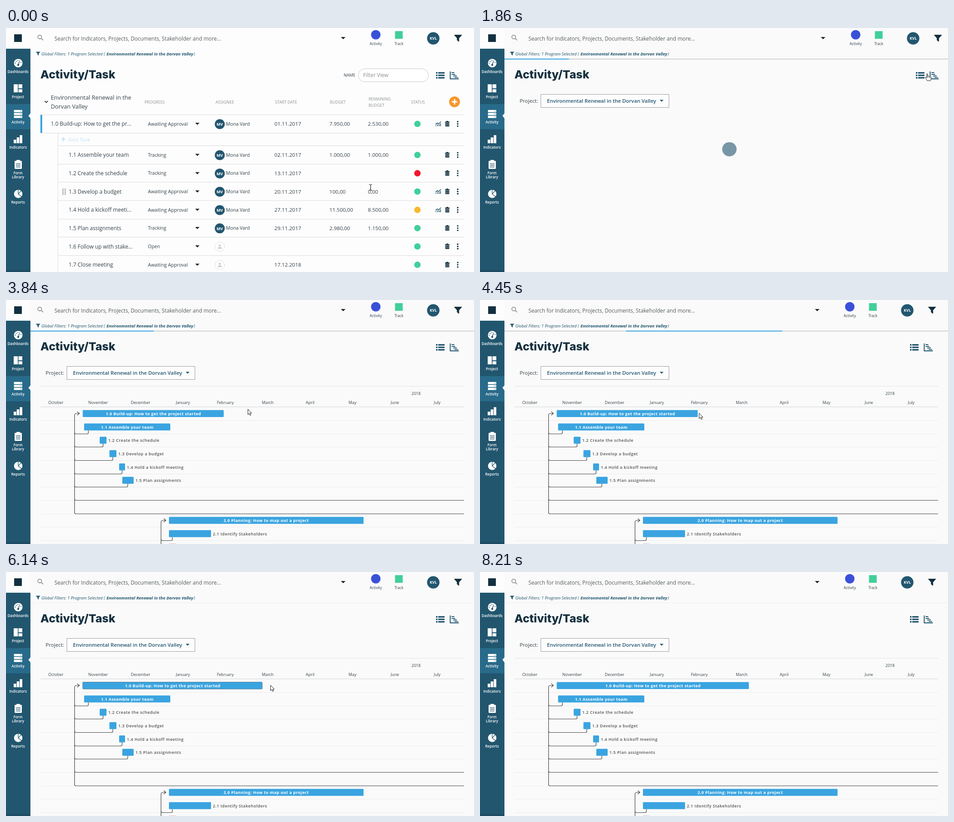
An HTML page that plays this animation: 1034 px wide and 542 px high, repeating every 8.57 s.

```html
<!DOCTYPE html>
<html lang="en">
<head>
<meta charset="utf-8">
<title>Activity planner</title>
<style>
  html, body { margin: 0; width: 100%; height: 100%; overflow: hidden; background: #fafafa; }
  svg { display: block; }
  text { font-family: "Open Sans", "Noto Sans", sans-serif; fill: #34424a; white-space: pre; }
  .title { font: 800 25px Inter, sans-serif; fill: #14303f; }
  .semi { font-weight: 600; }
  .bold { font-weight: 700; }
  .mid { text-anchor: middle; }
  .white { fill: #fff; }
  .navy { fill: #22566f; }
  .faint { fill: #c5e6f7; }
  .soft { fill: #555b60; }
  .head { fill: #8b8f92; }
  .it { font-style: italic; }
  .label { font-weight: 600; letter-spacing: .5px; fill: #505050; }
  .bar { font-weight: 700; letter-spacing: .4px; fill: #fff; text-anchor: middle; }
</style>
</head>
<body>
<svg id="stage" width="1034" height="542" viewBox="0 0 1034 542"></svg>
<script>
const LOOP = 8570;
const NAVY = '#22566f', BLUE = '#3aa4e0', GREEN = '#41cf9b', INK = '#14303f';
const PROGRAM = ['Environmental Renewal in the', 'Dorvan Valley'];
const PERSON = 'Mona Vard', INITIALS = 'MV';

const text = (x, y, str, size, cls = '', more = '') =>
  `<text x="${x}" y="${y}" font-size="${size}" class="${cls}" ${more}>${str}</text>`;
const rect = (x, y, w, h, fill, more = '') =>
  `<rect x="${x}" y="${y}" width="${w}" height="${h}" fill="${fill}" ${more}/>`;
const circle = (x, y, r, fill, more = '') =>
  `<circle cx="${x}" cy="${y}" r="${r}" fill="${fill}" ${more}/>`;
const path = (d, fill, more = '') => `<path d="${d}" fill="${fill}" ${more}/>`;
const line = (d, color, width = 1, more = '') =>
  path(d, 'none', `stroke="${color}" stroke-width="${width}" ${more}`);
const group = (id, body) => `<g id="${id}">${body}</g>`;
const each = (list, fn) => list.map(fn).join('');
const caret = (x, y, w, color) => path(`M${x} ${y}h${w}l${-w / 2} ${w / 2}z`, color);
const funnel = (x, y, s, color) =>
  path('M0 0H17L10.5 7.5V15L6.5 12V7.5Z', color,
    `transform="translate(${x} ${y}) scale(${s})" stroke="${color}" stroke-linejoin="round"`);

function sidebar() {
  const labels = [['Dashboards', 100], ['Project', 156], ['Activity', 212], ['Indicators', 268],
    ['Form', 325], ['Library', 334], ['Reports', 390]];
  return rect(0, 0, 54, 46, '#fdfdfd') + rect(18, 14, 17, 17, INK) +
    rect(0, 46, 54, 496, NAVY) + rect(0, 169, 54, 56, '#286a89') + rect(0, 538, 54, 4, '#1e4c62') +
    path('M54 189.5V200.5L49.5 195Z', '#fafafa') +
    circle(27, 78, 9.5, '#fff') +
    line('M20.5 79a6.5 6.5 0 0 1 13 0', NAVY, 1.8, 'stroke-dasharray="1.8 2.3"') +
    line('M27 82L29.5 75', NAVY, 1.5) + circle(27, 82, 2.2, NAVY) +
    rect(17, 125, 9, 18, '#fff') + rect(27.5, 125, 8.5, 9, '#fff') + rect(27.5, 136, 8.5, 7, '#fff') +
    each([182, 188.5, 195], y => rect(17.5, y, 18.5, 5, '#fff', 'rx="1"') + rect(32, y + 2, 2, 1, NAVY)) +
    each([0, 1, 2], i => rect(17 + i * 6.7, 248 - i * 5, 5.6, 8 + i * 5, '#fff')) +
    rect(19, 295, 16, 18, '#fff', 'rx="1.5"') + rect(23, 293, 8, 4, '#fff', 'rx="1"') +
    each([301, 304.5, 308], y => rect(22, y, 10, 1.3, NAVY)) +
    circle(27, 368.5, 9.3, '#fff') + line('M33 362L27 368.5L34 374.5M27 368.5V359', NAVY, 1.2) +
    each(labels, ([s, y]) => text(26.5, y, s, 8, 'mid semi white'));
}

function header() {
  const chartIcon = 'M980.5 96.5h2v15.5h18v2h-20zM984.5 98h6v2h-6zM984.5 102h8v2h-8zM988 105.5h8v2h-8zM991 109h8v1.8h-8z';
  return circle(74.5, 20, 4.2, 'none', 'stroke="#777" stroke-width="1.3"') +
    line('M77.5 23L82 27', '#777', 1.5) +
    text(107, 27.5, 'Search for Indicators, Projects, Documents, Stakeholder and more...', 11.72, 'soft') +
    funnel(66.5, 53, 0.52, NAVY) +
    text(78, 61, 'Global Filters: 1 Program Selected (', 9.2, 'it navy') +
    text(222, 61, PROGRAM.join(' '), 9.2, 'it bold navy') + text(415, 61, ')', 9.2, 'it navy') +
    group('tools',
      caret(740, 20, 10, '#222') +
      circle(817, 15, 10.5, '#3b50d8') + text(817, 38, 'Activity', 8.2, 'mid') +
      rect(859.5, 7, 17, 17, GREEN) + text(868, 38, 'Track', 8.2, 'mid') +
      circle(944, 23, 13.7, NAVY) + text(944, 26.2, 'KVL', 8.4, 'mid bold white') +
      funnel(990.5, 15.5, 0.97, INK)) +
    text(76, 112, 'Activity/Task', '', 'title') +
    group('views',
      each([98, 103.5, 109], y => rect(950, y, 3.5, 3.3, NAVY) + rect(955, y, 14, 3.3, NAVY)) +
      path(chartIcon, NAVY, 'id="chartIcon"'));
}

const handle = (x, y) => each([0, 1, 2, 3, 4, 5, 6, 7],
  i => rect(x + (i % 2) * 5, y - 6.5 + (i >> 1) * 3.7, 2.8, 2.4, '#a0a0a0'));

const rows = [
  ['1.0 Build-up: How to get the pr...', 'Awaiting Approval', '01.11.2017', '7.950,00', '2.530,00', 1],
  ['1.1 Assemble your team', 'Tracking', '02.11.2017', '1.000,00', '1.000,00'],
  ['1.2 Create the schedule', 'Tracking', '13.11.2017', '', ''],
  ['1.3 Develop a budget', 'Awaiting Approval', '20.11.2017', '100,00', '0,00', 1],
  ['1.4 Hold a kickoff meeti...', 'Awaiting Approval', '27.11.2017', '11.500,00', '8.500,00', 1],
  ['1.5 Plan assignments', 'Tracking', '29.11.2017', '2.980,00', '1.150,00'],
  ['1.6 Follow up with stake...', 'Open', '', '', ''],
  ['1.7 Close meeting', 'Awaiting Approval', '17.12.2018', '', '']
];
const rowY = i => i ? 282 + (i - 1) * 40.65 : 213;
const lights = { 2: '#f3172d', 4: '#f9b82f' };

function row([name, progress, date, budget, rest, chart], i) {
  const y = rowY(i), base = y + 4.3;
  const who = i < 6
    ? circle(472.3, y + 0.5, 11, NAVY) + text(472.3, y + 4, INITIALS, 9, 'mid bold white') + text(486, y + 3.8, PERSON, 10.4)
    : circle(472.3, y + 0.5, 10.5, 'none', 'stroke="#ccc" stroke-dasharray="2 1.5"') +
      circle(472.3, y - 2, 2.3, '#ccc') + path(`M467.8 ${y + 5}q0-3.5 3-3.5h3q3 0 3 3.5z`, '#ccc');
  return text(i ? 138.5 : 99, base, name, 11.85) + text(313.5, y + 3.8, progress, 10.5) +
    caret(418, y - 2.5, 9.5, '#222') + who +
    text(593, base, date, 11.6) + text(714.5, base, budget, 11.6) + text(799.5, base, rest, 11.6) +
    circle(909, y, 7.1, lights[i] || GREEN) +
    (chart ? line(`M949 ${y + 1}l4-3 3 2 5-5M950 ${y + 5}v-2M953.5 ${y + 5}v-4M957 ${y + 5}v-3.5M960 ${y + 5}v-6`, NAVY, 1.6) : '') +
    path(`M970 ${y - 5}h3v-1.5h4v1.5h3v2h-10zM970.8 ${y - 2.3}h8.4v8h-8.4z`, INK) +
    line(`M973.3 ${y - 1}v5.5M976.7 ${y - 1}v5.5`, '#fff', 0.8) +
    each([-5, 0, 5], d => circle(998, y + d, 1.7, INK)) +
    group('handle' + i, handle(i ? 124.5 : 86, y));
}

function listPage() {
  const heads = [['PROGRESS', 306, 168], ['ASSIGNEE', 463, 168], ['START DATE', 594.5, 168], ['BUDGET', 715.5, 168],
    ['REMAINING', 801, 160.5], ['BUDGET', 801, 174.5], ['STATUS', 895, 168]];
  return text(746, 108, 'NAME', 9.1) +
    rect(778.5, 90.5, 155, 29, '#fff', 'rx="14.5" stroke="#c8c8c8"') + text(789, 109, 'Filter View', 11.7, 'head') +
    line('M85.5 162L89 165.5L92.5 162', '#222', 1.6) +
    each(PROGRAM, (s, i) => text(99, 159 + i * 19.5, s, 12.8, '', 'font-weight="500"')) +
    each(heads, ([s, x, y]) => text(x, y, s, 8.9, 'head')) +
    circle(991, 164, 12, '#f7982c') + line('M991 158v12M985 164h12', '#fff', 3.2) +
    line('M76 192.5H1012M76 233.5H1012M114.5 233V542', '#dcdcdc') +
    rect(76, 193, 4, 40, BLUE) +
    each([0, 1, 2, 3, 4, 5, 6], i => line(`M114 ${Math.round(261 + i * 40.65) + 0.5}H1012`, '#dcdcdc')) +
    line('M122 247h9.5M126.7 242.3v9.5', '#bfe3f6', 2) + text(138, 251.5, 'Add Task', 11.6, 'faint') +
    each(rows, row);
}

function projectPicker() {
  return text(87.5, 166, 'Project:', 11.6) +
    rect(134.5, 147.5, 283, 29, '#fdfdfd', 'stroke="#9b9b9b"') +
    text(148, 166, PROGRAM.join(' '), 11.3, 'semi navy') + caret(397, 159.5, 8.5, NAVY);
}

const ROW = 29.65;
const rowLine = i => Math.floor(267.5 + i * ROW) + 0.5;
const chartBar = (x, end, i, more = '') => rect(x, 244.5 + i * ROW, end - x, 15.5, BLUE, `rx="1.5" ${more}`);

function ganttPage() {
  const months = ['October', 'November', 'December', 'January', 'February', 'March', 'April', 'May', 'June', 'July'];
  // bar start, bar end, connector x, label
  const tasks = [[172.5, 363, 182, ''], [207, 222, 214.5, '1.2 Create the schedule'], [228.5, 244, 236, '1.3 Develop a budget'],
    [250, 263, 256.5, '1.4 Hold a kickoff meeting'], [257, 282, 269, '1.5 Plan assignments']];
  const wire = d => line(d, '#454545', 1.2);
  const join = (x, from, i) => wire(`M${x} ${rowLine(i) - 8}v5q0 3-3 3H${from + 3}q-3 0-3-3`);
  return line('M76 191.5H1012', '#e2e2e2') + line('M76 237.5H1012', '#d6d6d6') +
    each([0, 1, 2, 3, 4, 5, 6, 7, 8, 9], i => line(`M76 ${rowLine(i)}H1012`, '#ededed')) +
    each(months, (m, i) => text(110 + i * 93.65, 230.5, m, 8.9, 'mid')) + text(906, 211, '2018', 8.9, 'mid') +
    wire('M151.5 472V256q0-4 4-4H162M157.5 248l4.7 4-4.7 4') +
    each([6, 7], i => wire(`M1012 ${rowLine(i) - 0.5}H154.5q-3 0-3-3`)) +
    wire('M342.5 542V493.5q0-4 4-4H353M348.5 485.5l4.7 4-4.7 4') + join(367.5, 342.5, 9) +
    each(tasks, ([x, end, drop, name], i) =>
      join(drop, 151.5, i + 1) + chartBar(x, end, i + 1) + text(end + 4, 256 + (i + 1) * ROW, name, 9, 'label')) +
    text(268, 285.7, '1.1 Assemble your team', 9, 'bar') +
    chartBar(360, 790, 8) + text(575, 493.3, '2.0 Planning: How to map out a project', 9, 'bar') +
    chartBar(360, 453, 9) + text(457, 523, '2.1 Identify Stakeholders', 9, 'label') +
    rect(360, 541.5, 15, 2, '#a9899f') +
    chartBar(169.5, 481, 0, 'id="mainBar"') +
    text(325, 256.2, '1.0 Build-up: How to get the project started', 9, 'bar', 'id="mainLabel"') +
    group('grips', each([0, 1], i =>
      rect(170, 245.5, 6.5, 14, '#d3d9dd', `id="grip${i}" rx="1.5" stroke="#7d8c96" stroke-width=".8"`)));
}

const outline = 'stroke="#222" stroke-width="1" stroke-linejoin="round"';
const cursors =
  group('ibeam', line('M-3.5-6.5q3 0 3.5 1.2q.5-1.2 3.5-1.2M0-5.5V5.5M-3.5 6.5q3 0 3.5-1.2q.5 1.2 3.5 1.2', '#222', 1.2)) +
  group('arrow', path('M.5.5V12.5L3.3 10L5.3 14.3L7.2 13.4L5.3 9.3H8.8Z', '#fff', outline)) +
  group('hand', path('M-1 1.2q1-1.5 2 0V6q3-.5 4 .5q3 0 4 1.5V11q-.5 3-2 5H0Q-3 12-4 9q0-1.5 1.5-.8L-1 9.8Z', '#fff', outline) +
    line('M1 6v3.5M4 7v3M6.5 8v2.5', '#222', 0.8)) +
  group('resize', path('M-8.5 0l4-3.8v2.7h9v-2.7l4 3.8-4 3.8v-2.7h-9v2.7z', '#fff', outline));

document.getElementById('stage').innerHTML =
  rect(0, 0, 1034, 542, '#fafafa', 'id="paper"') + sidebar() + header() +
  group('list', listPage()) +
  group('chart', projectPicker() + group('gantt', line('M54 68.5H1034', '#eee') + ganttPage())) +
  group('spinner', each(['pulseA', 'pulseB'], id => circle(551, 269.3, 0, NAVY, `id="${id}" opacity=".6"`))) +
  group('progress', rect(54, 68, 980, 2, '#d2d2d2') + rect(54, 68, 0, 2, BLUE, 'id="runner"')) +
  group('cursor', cursors);

const $ = id => document.getElementById(id);
const show = (id, on) => $(id).style.display = on ? '' : 'none';
const set = (id, name, value) => $(id).setAttribute(name, value);
const smooth = k => k * k * (3 - 2 * k);

// Value at time t along [time, value] points
function track(points, t, ease = k => k) {
  if (t <= points[0][0]) return points[0][1];
  for (let i = 1; i < points.length; i++) {
    const [t0, a] = points[i - 1], [t1, b] = points[i];
    if (t < t1) return a + (b - a) * ease((t - t0) / (t1 - t0));
  }
  return points[points.length - 1][1];
}

const route = [[360, 805.5, 354], [1210, 986, 114], [1270, 986, 114], [1390, 988, 101], [3390, 988, 101], [3840, 534, 242],
  [4400, 484, 251], [4900, 473, 252], [5750, 473, 252], [6140, 584, 251], [6370, 587, 252], [7570, 587, 252], [8190, 1002, 546]];
const routeX = route.map(p => [p[0], p[1]]), routeY = route.map(p => [p[0], p[2]]);
const barEnd = [[5750, 481], [6140, 566], [6370, 594]];
const loadClock = [[1860, 0.005], [2850, 0.5995], [3840, 1.166], [4950, 1.82]];
const shapes = [[450, 'ibeam'], [1270, 'arrow'], [3430, 'hand'], [4480, 'arrow'], [5810, 'resize'],
  [6300, 'arrow'], [7600, 'resize'], [8200, 'arrow'], [LOOP, '']];

function drawProgress(p) {
  const left = 54 + track([[0, -156], [0.8, 490], [0.95, 1176], [1, 980]], p);
  const width = 980 * track([[0.5, 0.3], [0.7, 0.7], [1, 0.3]], p);
  const x = Math.max(54, left), end = Math.min(1034, left + width);
  set('runner', 'x', x);
  set('runner', 'width', Math.max(0, end - x));
}

function draw(t) {
  const listed = t < 1860, loading = !listed && t < 2770;
  const shift = `translate(${loading ? 13 : 0} 0)`;
  show('list', listed);
  show('chart', !listed);
  show('gantt', t >= 2770);
  show('spinner', loading);
  set('tools', 'transform', shift);
  set('views', 'transform', shift);
  set('paper', 'fill', listed ? '#fdfdfd' : '#fafafa');

  const x = track(routeX, t, smooth), y = track(routeY, t, smooth);
  const shape = shapes.find(s => t < s[0])[1];
  ['ibeam', 'arrow', 'hand', 'resize'].forEach(id => show(id, id === shape));
  set('cursor', 'transform', `translate(${x.toFixed(1)} ${y.toFixed(1)})`);
  set('chartIcon', 'fill', shape === 'hand' && !loading ? '#222' : NAVY);
  rows.forEach((_, i) => show('handle' + i, Math.abs(y - rowY(i)) < 20.3));

  const saving = t >= 6730 && t < 7140;
  const waiting = t >= 1860 && t < 4950;
  show('progress', waiting || saving);
  if (saving) drawProgress((t - 6730) / 1700);
  else if (waiting) drawProgress(track(loadClock, t) % 1);
  if (loading) {
    const wave = track(loadClock, t) * 2;
    const size = smooth(wave < 1 ? wave : 2 - wave);
    set('pulseA', 'r', 15.9 * size);
    set('pulseB', 'r', 15.9 * (1 - size));
  }

  const end = track(barEnd, t), hover = t >= 4480 && t < 7600;
  set('mainBar', 'width', end - 169.5);
  set('mainBar', 'stroke', hover ? '#5f7f92' : 'none');
  set('mainLabel', 'x', (169.5 + end) / 2 + 0.5);
  set('grip1', 'x', end - 7);
  show('grips', shape === 'resize');
}

function frame() {
  draw(performance.now() % LOOP);
  requestAnimationFrame(frame);
}
frame();
</script>
</body>
</html>
```
